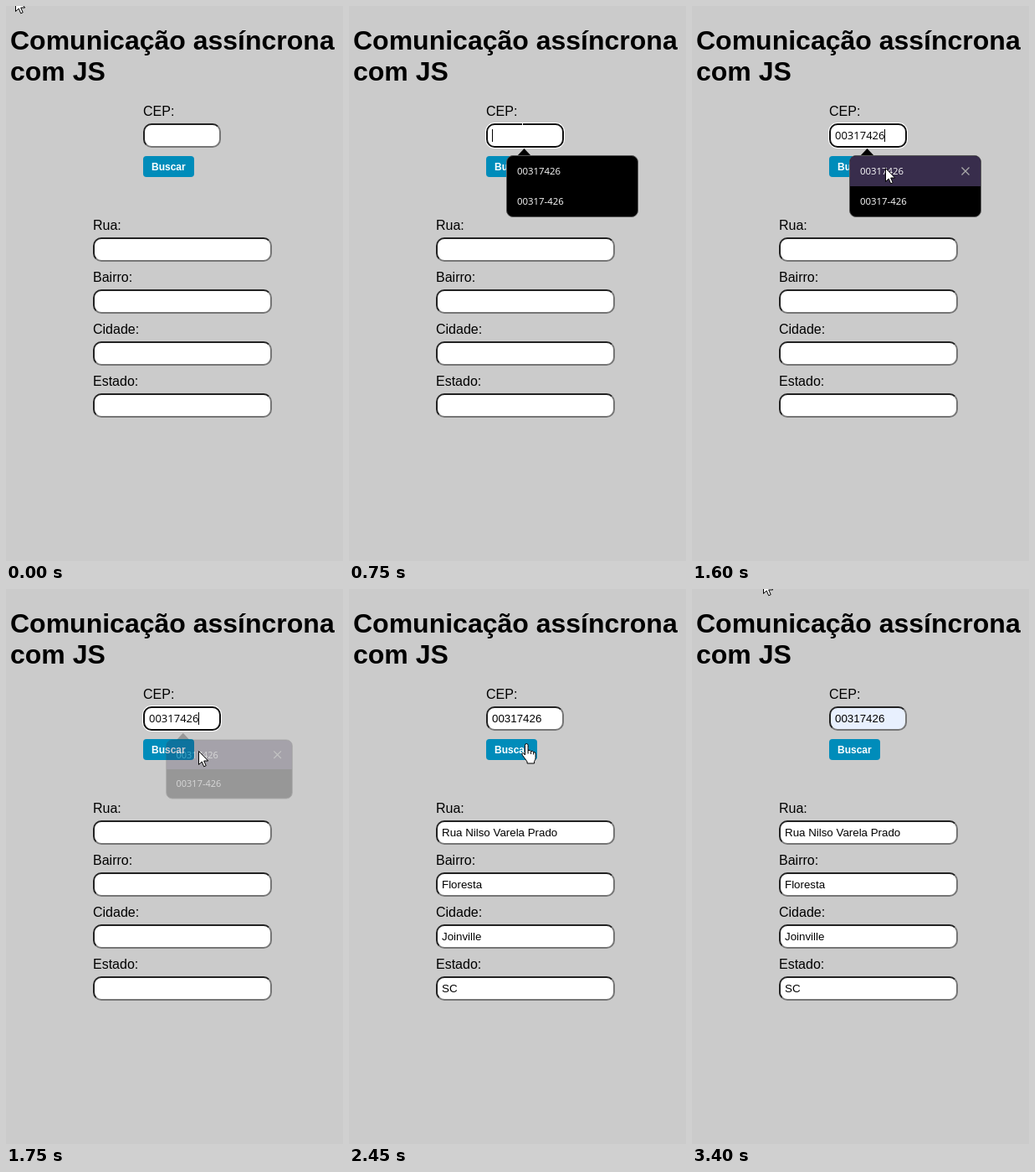
An HTML page that plays this animation: 403 by 662 pixels, repeating every 3500 ms.

```html
<!DOCTYPE html>
<html lang="pt-BR">
<head>
<meta charset="utf-8">
<title>Comunicação assíncrona com JS</title>
<style>
html, body { margin: 0; width: 100%; height: 100%; overflow: hidden; background: #cbcbcb; }
.field, #button { position: absolute; box-sizing: border-box; }
.field { left: 104px; width: 214px; height: 29px; border: 2px solid; border-color: #222 #767676 #767676 #222; border-radius: 10px; background: #fff; }
#cepBox { left: 164px; top: 140px; width: 93px; }
#cepBox.focus { border-color: #101010; box-shadow: 0 0 0 1px #fff; }
#cepBox.filled { background: #e8f0fe; }
#button { left: 164px; top: 179px; width: 61px; height: 25px; border-radius: 4px; background: #008cba; }
svg { position: absolute; left: 0; top: 0; }
text { font: 16px "Liberation Sans", Arial, sans-serif; }
.title { font-size: 32px; font-weight: bold; }
.value { font-size: 13.333px; }
.preview { font: 13px "Open Sans", sans-serif; }
.option { font: 11.4px "Open Sans", sans-serif; fill: #fff; }
.label { font-size: 12px; font-weight: bold; fill: #fff; }
</style>
</head>
<body>
<div class="field" id="cepBox"></div>
<div id="button"></div>
<svg id="stage" width="403" height="662">
  <text class="title" x="5" y="52">Comunicação assíncrona</text>
  <text class="title" x="5" y="89">com JS</text>
  <text x="164" y="131">CEP:</text>
  <text class="label" x="174" y="196">Buscar</text>
  <text id="cep" x="171" y="159">00317426</text>
  <path id="caret" stroke="#000" d="M0 147v15"/>
  <g id="popup">
    <path d="M201 179l8.500-9 8.500 9z"/>
    <rect x="188.500" y="178.500" width="157" height="73" rx="7.500" stroke="#555"/>
    <g id="hover">
      <path fill="#382d4c" d="M189 215v-29q0-7 7-7h142q7 0 7 7v29z"/>
      <path stroke="#aaa" stroke-width="1.300" d="M322.500 192.500l9 9m0-9l-9 9"/>
    </g>
    <text class="option" x="201" y="201">00317426</text>
    <text class="option" x="201" y="237">00317-426</text>
  </g>
  <path id="arrow" fill="#fff" stroke="#000" d="M.5 .5v16l3.700-3.500 2.500 5.800 2.500-1.100-2.500-5.700h5z"/>
  <g id="beam">
    <path stroke="#fff" d="M.5-8V8"/>
    <path id="beamEdge" stroke="#000" fill="none" d="M-1.500-7.500h5M1.500-7V7M-1.500 7.500h5"/>
  </g>
  <path id="hand" fill="#fff" stroke="#000" stroke-linejoin="round" d="M-1.500 13V1.500q0-2 1.800-2t1.800 2v6q3-.8 3.500 1 2.500-.8 3 1 2.500-.3 2.500 2v5q0 2-1.500 4v2.500h-8.500v-2l-5.500-7.500q-1.500-2.500 0-3 1.200-.3 2.900 2.500zM2.100 7.500v4m3.500-3v3.500m3-2.500v3"/>
</svg>
<script>
const $ = id => document.getElementById(id);
const show = (id, on) => $(id).style.display = on ? "" : "none";
const values = ["Rua", "Bairro", "Cidade", "Estado"].map((name, i) => {
  const top = 276 + 62 * i, box = document.createElement("div");
  box.className = "field";
  box.style.top = top + "px";
  document.body.insertBefore(box, $("stage"));
  addText(name + ":", 104, top - 9, "");
  return addText(["Rua Nilso Varela Prado", "Floresta", "Joinville", "SC"][i], 111, top + 19, "value");
});

function addText(str, x, y, cls) {
  const el = document.createElementNS("http://www.w3.org/2000/svg", "text");
  el.textContent = str;
  el.setAttribute("x", x);
  el.setAttribute("y", y);
  el.setAttribute("class", cls);
  $("stage").insertBefore(el, $("popup"));
  return el;
}

// time, x, y, eased arrival
const path = [
  [0, 11, -10], [550, 207, 147, 1], [900, 207, 147], [1350, 231, 193, 1], [1600, 231, 193],
  [1750, 230, 193], [1800, 230, 193], [2050, 212, 185, 1], [2650, 212, 185],
  [2950, 109, 43], [3200, 85, -3], [3400, 85, -11], [3500, 85, -11]
];

function pointer(t) {
  const i = path.findIndex(p => p[0] > t);
  const [t0, x0, y0] = path[i - 1], [t1, x1, y1, eased] = path[i];
  let k = (t - t0) / (t1 - t0);
  if (eased) k *= k * (3 - 2 * k);
  return [Math.round(x0 + (x1 - x0) * k), Math.round(y0 + (y1 - y0) * k)];
}

const clamp = v => Math.max(0, Math.min(1, v));

function draw(t) {
  const [x, y] = pointer(t);
  const inside = (l, tp, r, b) => x >= l && x < r && y >= tp && y < b;
  const alpha = Math.min(clamp((t - 600) / 150), clamp((1800 - t) / 200));
  const hover = alpha > 0 && inside(188, 178, 346, 215);
  const chosen = t >= 1600, focus = t >= 650 && t < 2150;

  $("popup").setAttribute("opacity", alpha);
  $("popup").setAttribute("transform", `translate(267 215) scale(${0.947 + 0.053 * alpha}) translate(-267 -215)`);
  show("hover", hover);

  show("cep", hover || chosen);
  $("cep").setAttribute("class", t < 2150 ? "preview" : "value");
  $("cepBox").className = "field" + (focus ? " focus" : "") + (t >= 2700 ? " filled" : "");
  show("caret", focus && (chosen || !hover && (t - 650) % 1000 < 500));
  $("caret").setAttribute("transform", `translate(${chosen ? 230.5 : 171.5})`);
  values.forEach(v => v.style.display = t >= 2450 ? "" : "none");

  const title = inside(5, 22, 392, 59) || inside(5, 59, 119, 96);
  const kind = title || inside(164, 140, 257, 169) ? "beam"
    : !alpha && inside(164, 179, 225, 204) ? "hand" : "arrow";
  for (const id of ["arrow", "beam", "hand"]) show(id, id === kind);
  show("beamEdge", title);
  $(kind).setAttribute("transform", `translate(${x} ${y})`);
}

const start = performance.now();
function tick() {
  const t = (performance.now() - start) % 3500;
  draw(Math.floor(t / 50) * 50);
  requestAnimationFrame(tick);
}
tick();
</script>
</body>
</html>
```
